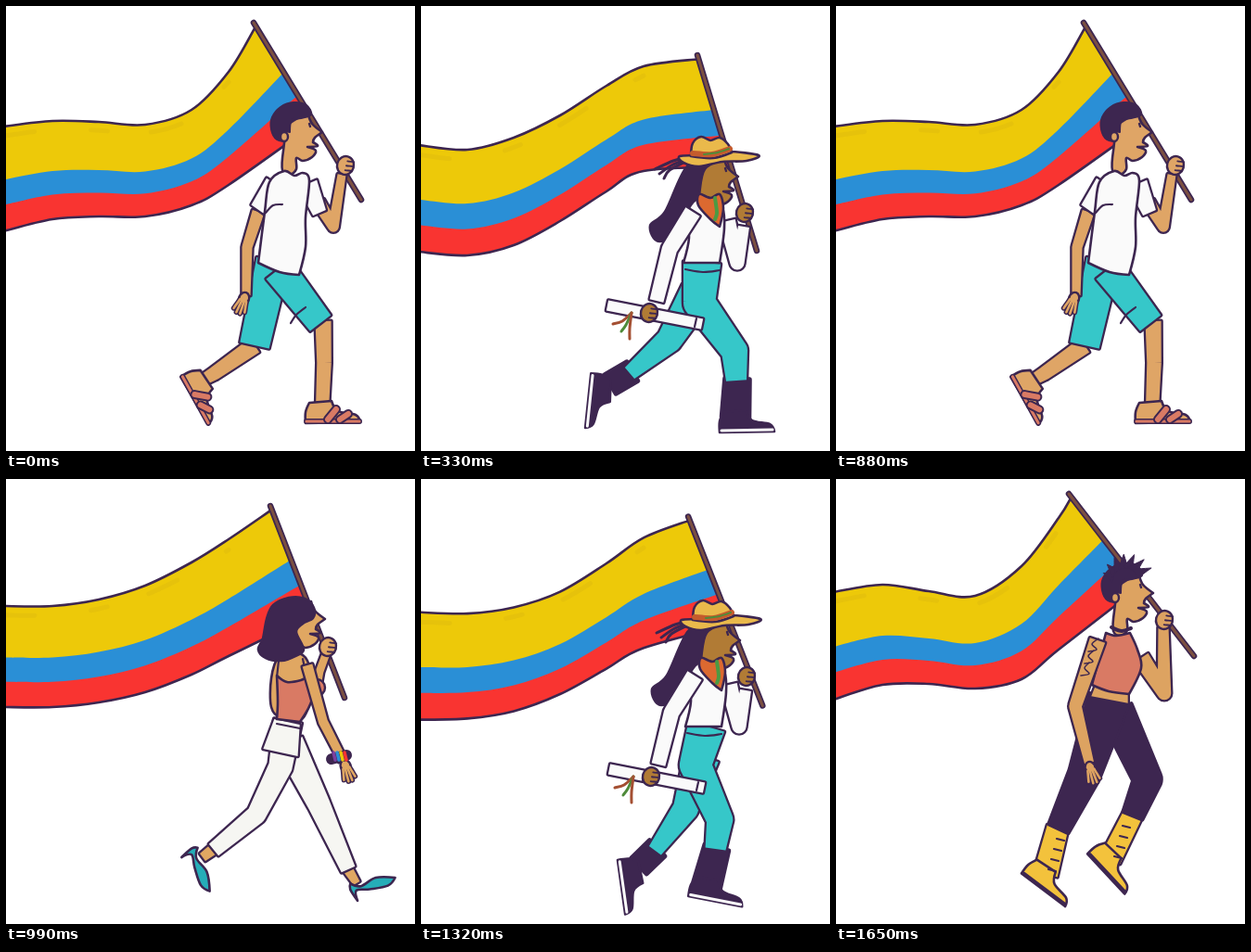
Write an HTML page that moves like this. It is 441x480 px and loops after 1.76 s.

```html
<!DOCTYPE html>
<html lang="en">
<head>
<meta charset="utf-8">
<title>Flag walk</title>
<style>
html, body { margin: 0; width: 100%; height: 100%; overflow: hidden; background: #fff; }
svg { display: block; width: 100%; height: 100%; }
</style>
</head>
<body>
<svg id="stage" viewBox="0 0 441 480" stroke-linejoin="round" stroke-linecap="round"></svg>
<script>
const INK = '#3d2650', WHITE = '#fafafa', TEAL = '#36c7c9', CORAL = '#d97a64',
  GOLD = '#f3c23c', YELLOW = '#edc909', BLUE = '#2a8fd6', RED = '#f93431', WOOD = '#7c5040';
const STEP = 110, COUNT = 16;

const loop = (n, f) => Array.from({ length: n }, (_, i) => f(i)).join('');
const mix = (a, b, k) => Array.isArray(a) ? a.map((v, i) => mix(v, b[i], k)) : +(a + (b - a) * k).toFixed(1);
const points = text => text.trim().split(/\s+/).map(t => {
  const [x, y] = t.replace('*', '').split(',').map(Number);
  return { x, y, hard: t.endsWith('*') };
});

// Smooth curve through "x,y" points; a trailing * makes a corner.
function curve(text, closed) {
  const pts = points(text), n = pts.length;
  const at = i => closed ? pts[(i + n) % n] : pts[Math.max(0, Math.min(n - 1, i))];
  const pull = (i, s) => {
    const p = at(i), a = at(i - 1), b = at(i + 1), k = p.hard ? 0 : s / 6;
    return (p.x + (b.x - a.x) * k).toFixed(1) + ' ' + (p.y + (b.y - a.y) * k).toFixed(1);
  };
  return `M${pts[0].x} ${pts[0].y}` + loop(closed ? n : n - 1, i =>
    `C${pull(i, 1)} ${pull(i + 1, -1)} ${at(i + 1).x} ${at(i + 1).y}`) + (closed ? 'Z' : '');
}
const fill = (c, pts, w = 2.6) => `<path d="${curve(pts, true)}" fill="${c}" stroke="${INK}" stroke-width="${w}"/>`;
const line = (pts, w = 2.2, c = INK) => `<path d="${curve(pts)}" fill="none" stroke="${c}" stroke-width="${w}"/>`;
const dot = (c, x, y, rx, ry = rx) =>
  `<ellipse cx="${x}" cy="${y}" rx="${rx}" ry="${ry}" fill="${c}" stroke="${INK}" stroke-width="2.4"/>`;
const place = (at, deg, s, parts) => `<g transform="translate(${at}) rotate(${deg}) scale(${s})">${parts}</g>`;

// Tapered tube along joints with one outline around it.
function limb(c, joints, from, to) {
  const pts = points(joints), last = pts.length - 1;
  const r = i => (from + (to - from) * i / last) / 2 - 1;
  const d = loop(last, i => {
    const a = pts[i], b = pts[i + 1], len = Math.hypot(b.x - a.x, b.y - a.y);
    const nx = (a.y - b.y) / len, ny = (b.x - a.x) / len;
    const side = (p, k) => (p.x + nx * k).toFixed(1) + ' ' + (p.y + ny * k).toFixed(1);
    const R = r(i + 1);
    return `M${side(a, r(i))}L${side(b, R)}L${side(b, -R)}L${side(a, -r(i))}Z` +
      (i + 1 < last ? `M${b.x - R} ${b.y}a${R} ${R} 0 1 0 ${2 * R} 0a${R} ${R} 0 1 0 ${-2 * R} 0Z` : '');
  });
  return `<path d="${d}" fill="${INK}" stroke="${INK}" stroke-width="4.6"/><path d="${d}" fill="${c}"/>`;
}

const hand = (c, at, deg) => place(at, deg, 1, dot(c, 4, 0, 7, 5.5) +
  [[5.6, INK], [2.6, c]].map(([w, k]) => loop(4, i => {
    const s = i - 1.5;
    return line(`6,${s * 2.4} ${22 - Math.abs(s) * 3},${s * 4.2}`, w, k);
  })).join('') + `<circle cx="4" r="4" fill="${c}"/>`);
const fist = (c, x, y) => place([x, y], 15, 1, dot(c, 0, 0, 9, 10) +
  loop(3, i => line(`1,${i * 5 - 5} 8,${i * 5 - 6}`, 1.8)));

// Footwear: ankle at the origin, toe to the right.
const shoe = (c, at, deg, s = 1, trim = '') =>
  place(at, deg, s, fill(c, '-14,-6* 10,-8* 17,3 36,7 41,15* -18,16* -18,4') + trim);
const sole = c => line('-16,14 39,13', 3, c);
const laces = loop(3, i => line(`${8 + i * 6},${-2 + i * 3} ${14 + i * 6},${-4 + i * 4}`, 1.8));
const straps = line('-17,14 40,14', 6) + line('-17,14 40,14', 3, CORAL) +
  loop(2, i => line(`${6 + i * 13},12 ${15 + i * 13},${1 + i * 5}`, 10) + line(`${6 + i * 13},12 ${15 + i * 13},${1 + i * 5}`, 6, CORAL));
const heel = (at, deg) => place(at, deg, 1, fill('#25adb8', '-8,0* 2,6 20,2 40,8* 30,14 10,12 -4,9 -6,20* -10,6'));

// Head in profile: tip of the nose at the origin.
const head = (c, at, extra) => place(at, 0, 1,
  fill(c, '-36,-8 -15,-19* -11,-9 0,0* -8,6 -10,11* -5,15 -16,16* -7,20 -11,27 -21,31 -28,28 -28,40 -35,46 -43,41 -42,20') +
  line('-14,-9 -13,-6', 2.4) + extra);
const cap = fill(INK, '-54,-16 -45,-27 -31,-32 -17,-29 -12,-19 -23,-15 -33,-13 -35,0* -41,0 -39,9 -49,8 -55,-3', 2);
const ear = c => dot(c, -41, 5, 4, 5);

let turn = [0, 0];
const leg = (i, hip, ...parts) => `<g transform="rotate(${turn[i]} ${hip})">${parts.join('')}</g>`;

// Flag edges: heights at the fixed XS; both edges then run to the pole.
const XS = [-3, 50, 100, 150, 200, 240];

const man = {
  pole: [267, 18, 383, 209],
  top: [130, 124, 125, 128, 112, 71], low: [243, 230, 227, 227, 215, 193],
  draw() {
    const skin = '#dfa566';
    return limb(skin, '337,212 353,238 362,182', 16, 11) + fist(skin, 366, 172) +
      limb(WHITE, '325,192 338,223', 24, 17) +
      leg(1, '290,290', limb(skin, '268,366 225,396 208,406', 20, 13), shoe(skin, '211,408', 61, 1, straps),
        limb(TEAL, '288,275 268,366', 38, 34)) +
      leg(0, '300,290', limb(skin, '342,340 343,385 341,434', 19, 16), shoe(skin, '341,434', 0, 1, straps),
        limb(TEAL, '294,284 339,342', 36, 30)) +
      line('307,342 313,333 323,325') +
      limb(skin, '272,222 260,260 259,312', 15, 11) + hand(skin, '258,312', 112) +
      head(skin, '341,136', cap + ear(skin)) +
      limb(WHITE, '290,192 271,219', 24, 18) +
      fill(WHITE, '300,178 311,183 320,180 327,188 323,228 323,260 316,290* 295,287 272,277* 279,222 284,190') +
      line('280,223 288,215 298,214');
  }
};

const rider = {
  pole: [298, 53, 362, 264],
  top: [150, 155, 142, 118, 86, 65], low: [265, 269, 258, 232, 200, 178],
  draw() {
    const skin = '#b17b35', tan = '#eab94b';
    return fill(INK, '310,168 286,174 263,222 247,237 257,254 287,237 313,195') +
      leg(1, '298,300', limb(INK, '228,394 204,408', 26, 26), shoe(INK, '197,416', 97, 1, sole(WHITE)),
        limb(TEAL, '298,310 268,360 225,396', 40, 18)) +
      leg(0, '304,290', limb(INK, '341,402 339,444', 29, 32), shoe(INK, '340,444', 0, 1, sole(WHITE)),
        limb(TEAL, '303,277 300,320 338,372 340,404', 42, 24)) +
      line('285,284 304,287 322,285') +
      limb(WHITE, '330,232 341,277 348,238', 20, 14) + fist(skin, 349, 223) +
      head(skin, '342,184', '') +
      fill(WHITE, '298,208 286,225 289,250 283,277* 322,277* 327,240 325,217 315,208') +
      limb(WHITE, '293,222 268,262 254,318', 20, 17) +
      limb(WHITE, '201,323 303,343', 13, 13) + line('240,326 237,335') + line('297,337 295,346') + fist(skin, 246, 331) +
      loop(3, i => line(`227,331 ${217 + i * 4},${340 + i * 4} ${207 + i * 9},${343 + i * 8}`, 3, i % 2 ? '#4f8b3a' : '#a44f32')) +
      fill('#dc6930', '300,203 312,207 322,203 326,218 322,238* 312,230 299,215') + line('317,207 319,223 317,230', 4, '#4c9a43') +
      loop(3, i => line(`287,${163 + i * 2} ${272 - i * 2},${167 + i * 5} ${252 + i * 5},${176 + i * 5}`, 3)) +
      fill(tan, '279,162 302,161 330,157 364,161 351,167 325,168 300,173 283,169') +
      fill(tan, '291,162* 293,148 302,141 312,145 322,142 331,149 335,158* 315,164') +
      line('293,159 314,160 333,154', 6, '#c45b2d') + line('305,160 320,158 332,154', 2, '#4f8b3a');
  }
};

const beard = {
  pole: [268, 15, 381, 205],
  top: [131, 125, 131, 129, 101, 60], low: [249, 237, 235, 232, 214, 191],
  draw() {
    const skin = '#a66e35';
    return limb(skin, '331,222 338,234 360,174', 15, 11) + fist(skin, 364, 167) +
      limb(TEAL, '322,205 333,230', 18, 15) +
      leg(1, '302,285', shoe(GOLD, '279,407', 52, .78, sole(WHITE) + laces), limb(WHITE, '304,285 319,346 278,393', 30, 20)) +
      leg(0, '295,275', shoe(GOLD, '252,425', 25, .9, sole(WHITE) + laces), limb(WHITE, '294,262 273,355 249,422', 38, 22)) +
      line('265,359 260,372') +
      fill(TEAL, '298,168 315,182 324,200 314,250 312,283 295,265 275,254 282,210 290,180') +
      limb(skin, '308,205 314,255 326,310', 16, 11) + hand(skin, '327,310', 75) +
      limb(CORAL, '323,293 327,306', 15, 14) + limb(TEAL, '304,178 304,207', 24, 27) +
      head(skin, '341,131', cap + dot(INK, -53, 27, 7, 9) + ear(skin) +
        fill(INK, '-42,12 -30,17 -18,13 -4,18 -2,28 -9,36 -24,40 -40,33')) +
      fill('#e5827b', '296,159 312,169 326,166 332,180 331,198* 322,196 320,184 309,178 298,170');
  }
};

const heels = {
  pole: [285, 29, 365, 236],
  top: [137, 137, 130, 115, 90, 65], low: [246, 246, 241, 230, 211, 191],
  draw() {
    const skin = '#e0a762', pants = '#f6f6f2';
    return limb(skin, '335,224 338,208 346,186', 11, 10) + fist(skin, 347, 181) + dot(CORAL, 335, 225, 9) +
      leg(0, '305,285', limb(skin, '368,420 378,436', 13, 10), heel('379,434', -17),
        limb(pants, '305,285 337,350 369,421', 34, 18)) +
      leg(1, '300,285', limb(skin, '224,399 212,408', 14, 12), heel('210,405', 65),
        limb(pants, '304,261 296,310 270,362 224,400', 32, 18), limb(pants, '303,262 296,295', 30, 40)) +
      line('292,264 317,269') +
      head(skin, '344,151', '') +
      fill(skin, '294,192 312,187 325,196 330,225 320,258 297,258 286,246 286,215') +
      fill(CORAL, '292,212* 303,219 318,217 325,213* 330,237 317,262* 292,259* 293,240') +
      line('294,196 292,214') + line('320,194 324,214') +
      limb(skin, '325,201 342,262 363,303', 13, 11) + hand(skin, '365,306', 72) +
      line('351,302 367,298', 12) + [RED, YELLOW, BLUE, '#7b3fa0'].map((c, i) => line(`${365 - i * 4},295 ${367 - i * 4},303`, 3.5, c)).join('') +
      fill(INK, '281,151 288,136 305,128 322,129 332,139 331,150 320,156 313,165 321,184 312,191 297,196 280,193 272,184 277,172');
  }
};

const waves = {
  pole: [295, 47, 362, 258],
  top: [154, 156, 143, 114, 83, 64], low: [269, 269, 259, 234, 200, 180],
  draw() {
    const skin = '#ad7634';
    return limb(skin, '330,224 345,206', 13, 11) + fist(skin, 345, 208) +
      leg(1, '290,305', limb(skin, '212,401 196,407', 17, 15), shoe(GOLD, '198,412', 93, 1, sole(WHITE) + laces),
        limb(TEAL, '290,300 268,360 211,402', 48, 18)) +
      leg(0, '300,295', limb(skin, '338,436 338,450', 16, 16), shoe(GOLD, '339,445', 0, 1, sole(WHITE) + laces),
        limb(TEAL, '303,284 301,324 341,376 338,440', 46, 20)) +
      line('270,312 274,331 302,348') + line('286,289 305,291 322,289') +
      head(skin, '344,173', '') +
      fill(WHITE, '298,228 310,212 323,209 327,215 319,233 321,284* 300,287 283,279* 288,255') +
      limb(skin, '323,218 328,275 347,328', 18, 12) + hand(skin, '350,336', 80) + limb(CORAL, '342,318 348,332', 18, 17) +
      loop(10, i => {
        const k = i / 9;
        return dot(INK, 303 - 38 * Math.sin(k * 2) + (i % 2 ? 4 : -3), 172 + k * 122, 22 - 7 * k);
      });
  }
};

const pack = {
  pole: [267, 10, 378, 203],
  top: [128, 131, 130, 119, 88, 45], low: [242, 242, 239, 232, 212, 184],
  draw() {
    const skin = '#694529', pants = '#db7c66';
    return limb(skin, '335,222 344,237 353,172', 20, 12) + fist(skin, 356, 163) +
      leg(0, '285,275', shoe(WHITE, '255,420', 30, .88), limb(pants, '284,290 268,355 251,415', 30, 15)) +
      leg(1, '295,275', shoe(WHITE, '278,401', 68, .85), limb(pants, '292,262 317,354 277,390', 46, 15)) +
      fill(WHITE, '290,158 299,158 300,175 284,205 273,231 260,238 247,231 253,196 268,186 270,171') +
      line('270,184 262,210 256,232') + line('278,170 272,190') + line('251,215 264,218') +
      head(skin, '346,142', '') +
      fill(TEAL, '300,168 318,170 324,187 335,200 340,211* 327,226 317,264* 290,262* 287,235 288,190') +
      limb(skin, '282,210 274,245 291,296', 19, 12) + hand(skin, '291,297', 90) +
      limb(TEAL, '298,180 281,211', 26, 18) + limb(WHITE, '301,168 317,182 316,204', 10, 8) +
      place('346,142', 0, 1, line('-40,6 -34,14 -24,19 -13,15', 4) + cap + line('-13,-10 -8,-9', 2) +
        loop(9, i => dot(INK, -33 + 22 * Math.cos(2.9 + i * .37), -11 + 19 * Math.sin(2.9 + i * .37), 4)));
  }
};

const boots = {
  pole: [251, 16, 386, 191],
  top: [122, 114, 121, 126, 94, 42], low: [238, 222, 221, 226, 216, 184],
  draw() {
    const skin = '#dda361';
    const shaft = (x, y) => loop(4, i => line(`${x - i * 3},${y + i * 11} ${x + 8 - i * 3},${y + 2 + i * 11}`));
    return limb(skin, '329,193 354,231 353,160', 20, 13) + fist(skin, 354, 152) +
      leg(1, '300,260', limb(GOLD, '321,360 296,410', 23, 25), shoe(GOLD, '295,407', 48, 1, sole(INK)), shaft(309, 374),
        limb(INK, '302,250 336,324 320,363', 38, 24)) +
      leg(0, '285,265', limb(GOLD, '239,376 226,426', 25, 28), shoe(GOLD, '224,424', 38, 1, sole(INK)), shaft(238, 388),
        limb(INK, '294,238 268,318 240,377', 46, 25)) +
      limb(skin, '298,222 295,238', 36, 42) +
      head(skin, '342,123', '') +
      fill(CORAL, '291,166* 302,169 317,166* 325,184 329,204 316,232* 294,229 276,222* 283,196') +
      limb(skin, '282,174 258,245 273,306', 19, 12) + hand(skin, '273,308', 72) +
      loop(3, i => line(`${283 - i * 5},${172 + i * 13} ${276 - i * 4},${178 + i * 13} ${281 - i * 4},${184 + i * 13} ${272 - i * 4},${186 + i * 13}`, 1.5)) +
      line('297,160 308,164 318,161', 4) +
      place('342,123', 0, 1, cap + ear(skin) + loop(7, i => {
        const a = 3.3 + i * .4, ray = (r, t) => `${(-30 + r * Math.cos(t)).toFixed(1)},${(-14 + r * Math.sin(t)).toFixed(1)}*`;
        return fill(INK, `${ray(14, a - .4)} ${ray(25 + i, a + .15)} ${ray(14, a + .4)}`, 1);
      }));
  }
};

function banner({ pole, top, low }) {
  const along = t => mix(pole.slice(0, 2), pole.slice(2), t);
  const row = (k, t) => mix(top, low, k).map((y, i) => XS[i] + ',' + y).concat(along(t).join());
  const rows = [row(0, .02), row(.51, .28), row(.75, .41), row(1, .57)];
  const band = (c, r) => `<path d="${curve(rows[0].join(' '))}L${r[r.length - 1]}${
    curve([...r].reverse().join(' ')).replace(/^M[^C]+/, '')}Z" fill="${c}"/>`;
  const brush = mix(top, low, .09).map((y, i) => XS[i] + ',' + y).join(' ');
  return band(RED, rows[3]) + band(BLUE, rows[2]) + band(YELLOW, rows[1]) +
    `<path d="${curve(brush)}" fill="none" stroke="#cda712" stroke-width="5" stroke-dasharray="34 61 18 47" opacity=".22"/>` +
    line(rows[0].join(' '), 2.6) + line(rows[3].join(' '), 2.6) +
    [[6.5, INK], [3, WOOD]].map(([w, c]) => line(`${pole[0]},${pole[1]} ${pole[2]},${pole[3]}`, w, c)).join('');
}

// In-between poses: walker, flag blend [from, to, share], body shift, leg turns
const between = {
  low: (who, to) => ({ who, blend: [heels, to, .55], shift: [0, -5], legs: [-4, -3] }),
  rise: who => ({ who, blend: [who, beard, .33], shift: [2, -10], legs: [12, -14] }),
  pass: who => ({ who, blend: [waves, who, .67], shift: [-1, 6], legs: [-7, 9] })
};
const cast = [
  man, heels, between.low(waves, rider), rider, between.rise(waves), between.pass(beard), beard, boots,
  man, heels, between.low(rider, waves), waves, between.rise(rider), between.pass(pack), pack, boots
].map(c => c.who ? c : { who: c, blend: [c, c, 0], shift: [0, 0], legs: [0, 0] });

const stage = document.getElementById('stage');
stage.innerHTML = cast.map(({ who, blend: [a, b, k], shift, legs }) => {
  turn = legs;
  const flag = { pole: mix(a.pole, b.pole, k), top: mix(a.top, b.top, k), low: mix(a.low, b.low, k) };
  return `<g display="none">${banner(flag)}<g transform="translate(${shift})">${who.draw()}</g></g>`;
}).join('');

let shown = -1;
function update() {
  const i = Math.floor(performance.now() / STEP) % COUNT;
  if (i !== shown) {
    if (shown >= 0) stage.children[shown].setAttribute('display', 'none');
    stage.children[i].removeAttribute('display');
    shown = i;
  }
  requestAnimationFrame(update);
}
update();
</script>
</body>
</html>
```
